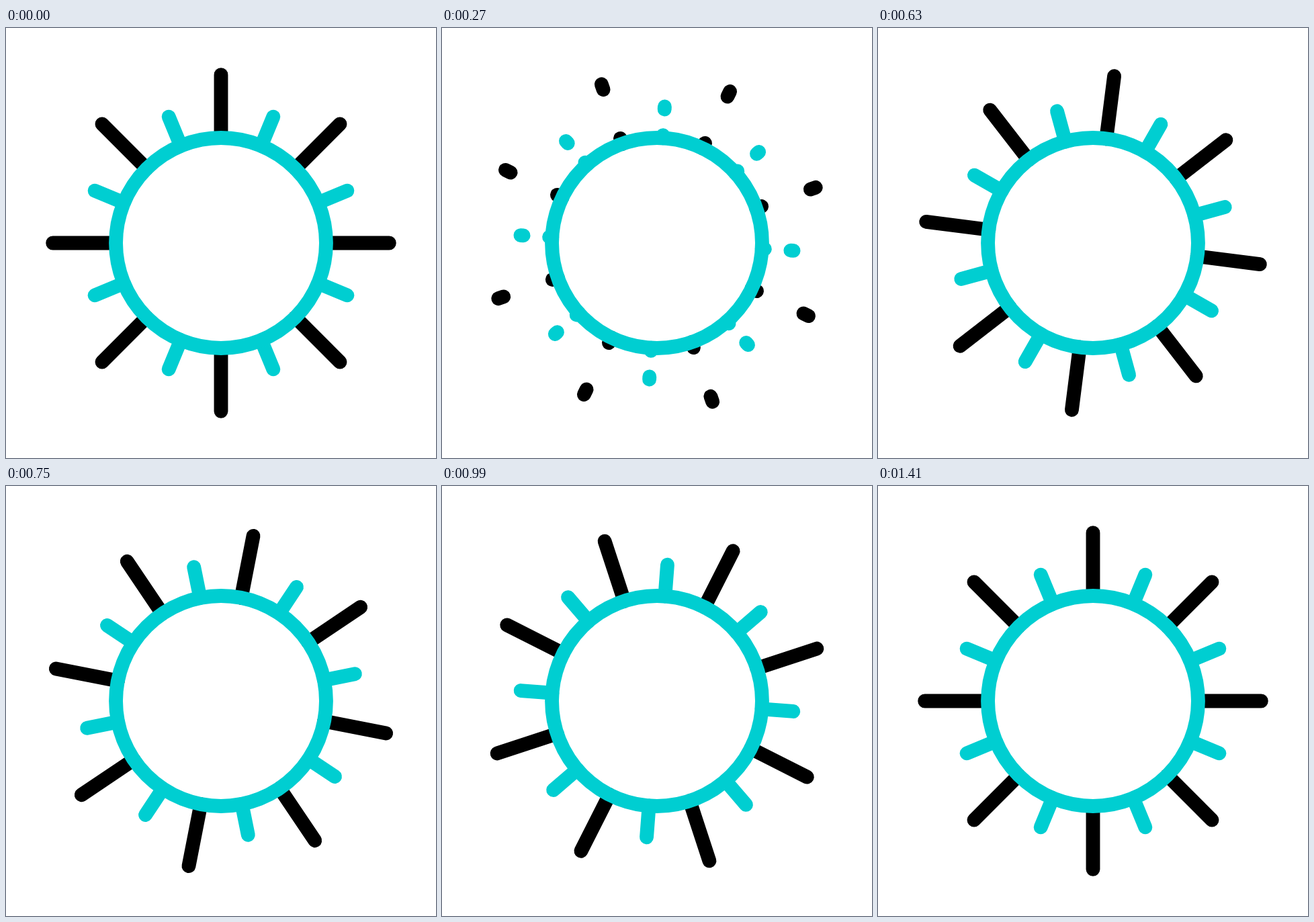
An HTML page with a canvas for the animation above (1.51 s loop, 640x640 px).

```html
<!DOCTYPE html>
<html lang="en">
<head>
<meta charset="utf-8">
<title>Sun</title>
<style>
  html, body { margin: 0; width: 640px; height: 640px; overflow: hidden; background: #fff; }
  canvas { display: block; }
</style>
</head>
<body>
<canvas id="stage" width="640" height="640"></canvas>
<script>
const ctx = document.getElementById('stage').getContext('2d');
const LOOP = 1510, STEP = 30, TURN = 18, LAST = 47;
const SWING = -38.57, GAP = 0.82;
const UNIT = 10.43, RING = 15 * UNIT;
const BLACK = '#000', CYAN = '#00ced1';

// cubic-bezier(.42, 0, .58, 1)
function easeInOut(x) {
  let lo = 0, hi = 1;
  for (let i = 0; i < 30; i++) {
    const s = (lo + hi) / 2, r = 1 - s;
    if (1.26 * s * r * r + 1.74 * s * s * r + s * s * s < x) lo = s; else hi = s;
  }
  return lo * lo * (3 - 2 * lo);
}

// Eight rays whose dash travels outwards, followed by a gap and the next dash
function rays(color, tip, offset, shift) {
  const at = k => -(RING + (tip - RING) * k);
  const line = (a, b) => { ctx.moveTo(0, at(a)); ctx.lineTo(0, at(b)); };
  ctx.strokeStyle = color;
  for (let i = 0; i < 8; i++) {
    ctx.save();
    ctx.rotate((i * 45 + offset) * Math.PI / 180);
    ctx.beginPath();
    if (shift < 1) line(shift, 1);
    if (shift > GAP) line(0, shift - GAP);
    ctx.stroke();
    ctx.restore();
  }
}

function draw(ms) {
  const n = Math.min(LAST, Math.floor(ms / STEP));
  const out = easeInOut(Math.min(n / TURN, 1));
  const back = n > TURN ? easeInOut((n - TURN) / (LAST - TURN)) : 0;
  const angle = n === LAST ? 0 : SWING * (out - back);
  const shift = n < TURN ? out * (1 + GAP) : 0;

  ctx.setTransform(1, 0, 0, 1, 0, 0);
  ctx.fillStyle = '#fff';
  ctx.fillRect(0, 0, 640, 640);
  ctx.translate(320, 320);
  ctx.lineWidth = 2 * UNIT;
  ctx.lineCap = 'round';
  rays(BLACK, 24 * UNIT, angle, shift);
  rays(CYAN, 19.5 * UNIT, angle + 22.5, shift);
  ctx.beginPath();
  ctx.arc(0, 0, RING, 0, 2 * Math.PI);
  ctx.stroke();
}

const start = performance.now();
function tick() {
  draw((performance.now() - start) % LOOP);
  requestAnimationFrame(tick);
}
tick();
</script>
</body>
</html>
```
